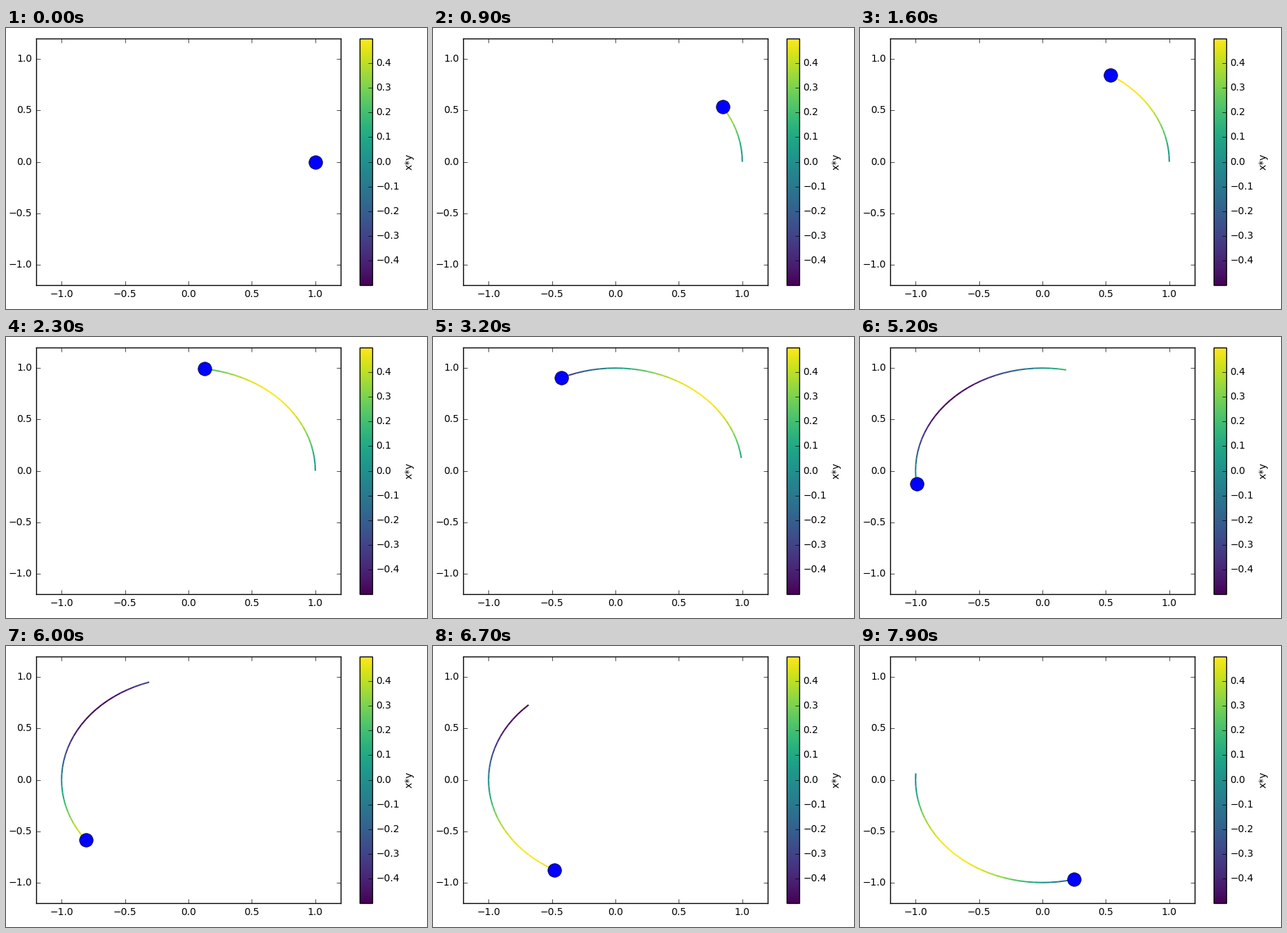
A matplotlib script that plays this animation: 600x400 px, repeating every 8000 ms.

```python
import numpy as np
import matplotlib.pyplot as plt
from matplotlib.animation import FuncAnimation
from matplotlib.cm import ScalarMappable
from matplotlib.collections import LineCollection
from matplotlib.colors import Normalize

W, H, DPI = 600, 400, 100
FRAMES, INTERVAL = 80, 100
STEPS = 100  # points on the full circle
TAIL = 30    # longest trail, in segments

plt.style.use("classic")
plt.rcParams.update({
    "figure.dpi": DPI,
    "savefig.dpi": DPI,
    "figure.facecolor": "white",
    "font.family": "DejaVu Sans",
    "font.size": 10,
    "axes.labelsize": 10,
    "xtick.labelsize": 10,
    "ytick.labelsize": 10,
})


def box(left, top, right, bottom):
    """Pixel edges to a figure-relative rectangle."""
    return [left / W, 1 - bottom / H, (right - left) / W, (bottom - top) / H]


theta = 2 * np.pi * np.arange(STEPS + 1) / STEPS
x, y = np.cos(theta), np.sin(theta)
xy = x * y
points = np.column_stack([x, y])
segments = np.stack([points[:-1], points[1:]], axis=1)

mapper = ScalarMappable(Normalize(xy.min(), xy.max()), "viridis")
mapper.set_array(xy)
colors = mapper.to_rgba(xy[:-1])

fig = plt.figure(figsize=(W / DPI, H / DPI))
ax = fig.add_axes(box(43, 15, 477, 366))
ax.set_xlim(-1.2, 1.2)
ax.set_ylim(-1.2, 1.2)
ax.set_xticks(np.arange(-1, 1.1, 0.5))
ax.set_yticks(np.arange(-1, 1.1, 0.5))

cax = fig.add_axes(box(504.1, 15, 521.6, 366))
bar = fig.colorbar(mapper, cax=cax, ticks=np.arange(-4, 5) / 10)
bar.set_label("x*y")

trail = LineCollection([], linewidths=1.5)
ax.add_collection(trail, autolim=False)
dot, = ax.plot([], [], "o", color="blue", markersize=14,
               markeredgecolor="black", markeredgewidth=0.5, zorder=3)


def update(i):
    start = max(0, i - TAIL)
    trail.set_segments(segments[start:i])
    trail.set_color(colors[start:i])
    dot.set_data([x[i]], [y[i]])
    return trail, dot


anim = FuncAnimation(fig, update, frames=FRAMES, interval=INTERVAL,
                     repeat=True, repeat_delay=0)
plt.show()
```
